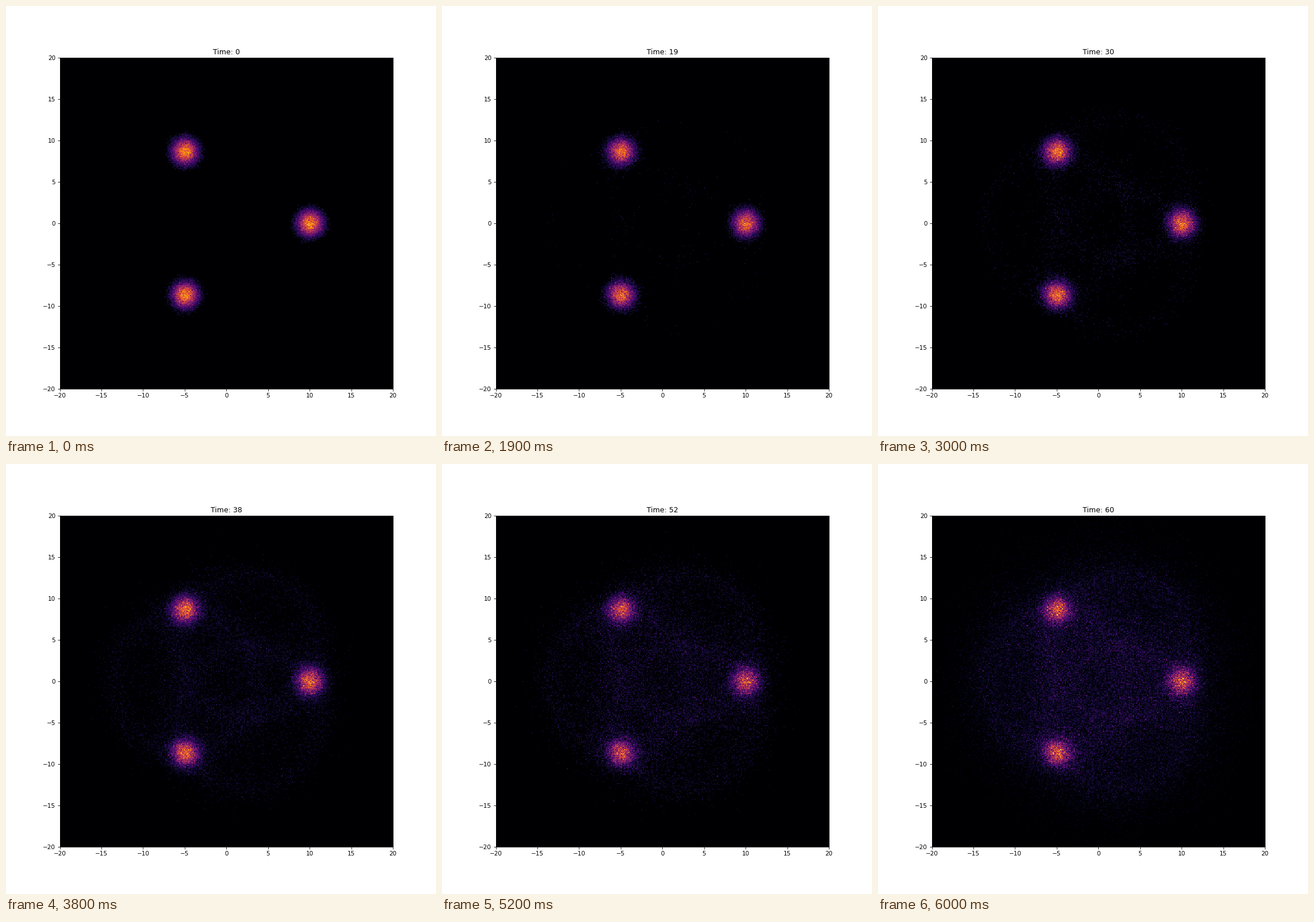
Recreate the animation shown at these times as a matplotlib script. Size 748 px wide and 748 px high, loop 6.1 s.

```python
import numpy as np
import matplotlib.pyplot as plt
from matplotlib.animation import FuncAnimation

STEPS = 61
COUNT = 100_000
BINS = 400
LIMIT = 20
HIT_CHANCE = 0.035

rng = np.random.default_rng(7)


def start_beams():
    """Three Gaussian beams in velocity space, 120 degrees apart."""
    angle = 2 * np.pi * (np.arange(COUNT) % 3) / 3
    return 10 * np.exp(1j * angle) + rng.normal(size=COUNT) + 1j * rng.normal(size=COUNT)


def collide(v):
    """Scatter random pairs elastically into uniform directions."""
    a, b = rng.permutation(COUNT).reshape(2, -1)
    hit = rng.random(len(a)) < HIT_CHANCE
    a, b = a[hit], b[hit]
    mean = (v[a] + v[b]) / 2
    turn = np.exp(2j * np.pi * rng.random(len(a)))
    kick = np.abs(v[a] - v[b]) / 2 * turn
    v[a], v[b] = mean + kick, mean - kick


def histogram(v):
    span = [[-LIMIT, LIMIT]] * 2
    counts = np.histogram2d(v.imag, v.real, bins=BINS, range=span)[0]
    return counts.astype(np.uint16)


def simulate():
    v = start_beams()
    grids = [histogram(v)]
    for _ in range(STEPS - 1):
        collide(v)
        grids.append(histogram(v))
    return grids


def visible(grid, step):
    """Drop the faintest counts; the floor sinks as the beams thin out."""
    floor = 4.3 * (1 - step / 70)
    return np.where(grid > floor, grid, 0)


grids = simulate()

plt.rcParams["font.family"] = "DejaVu Sans"
fig, ax = plt.subplots(figsize=(10, 10), dpi=74.8)
image = ax.imshow(grids[0], cmap="inferno", origin="lower", aspect="auto",
                  interpolation="nearest",
                  extent=(-LIMIT, LIMIT, -LIMIT, LIMIT))
title = ax.set_title("Time: 0")


def draw(step):
    grid = grids[step]
    image.set_data(visible(grid, step))
    image.set_clim(0, grid.max())
    title.set_text(f"Time: {step}")
    return image, title


anim = FuncAnimation(fig, draw, frames=STEPS, interval=100, repeat=True)
plt.show()
```
